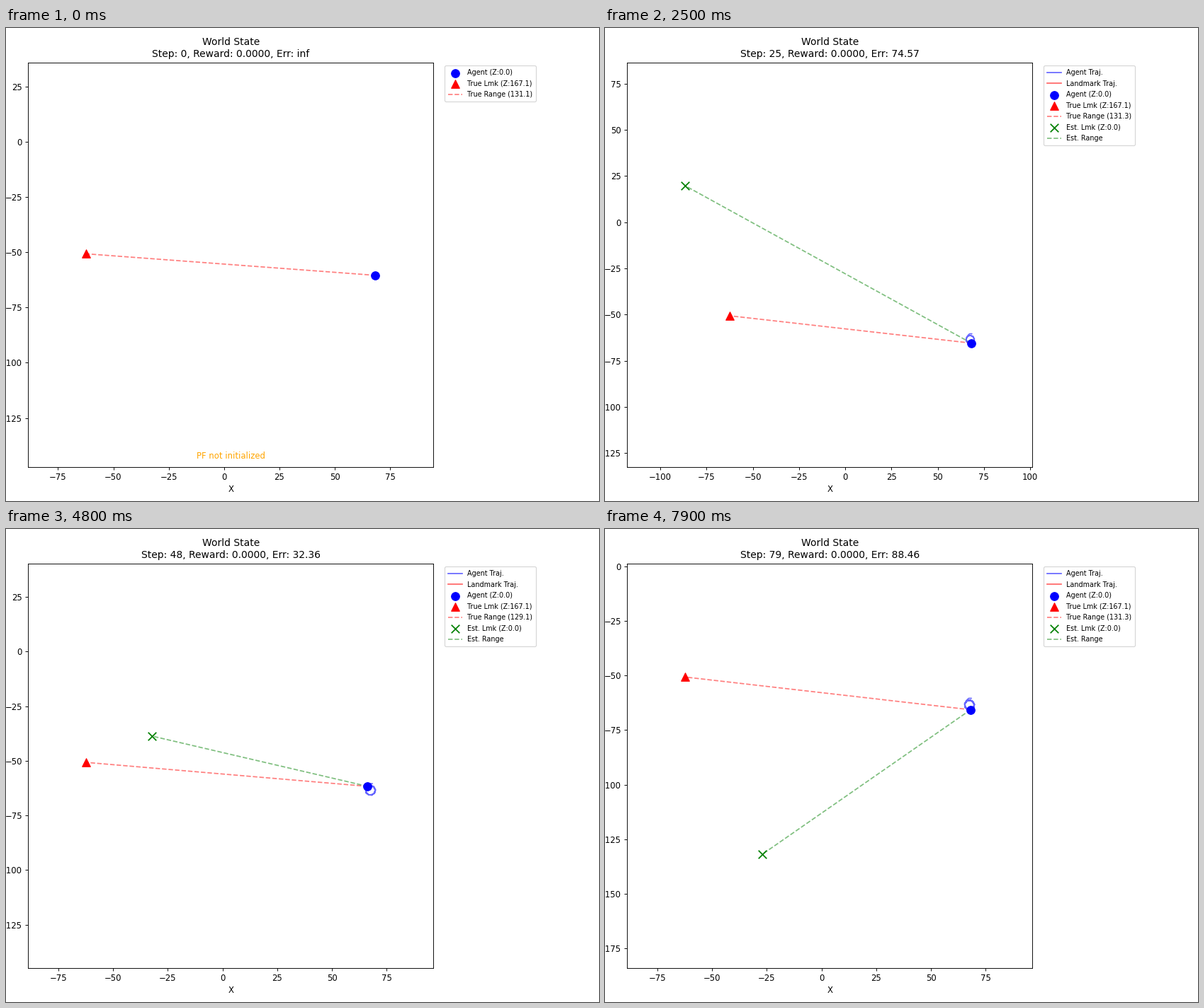
These frames come from a looping animation (837x669 px, 8000 ms). A matplotlib script:

```python
import numpy as np
import matplotlib.pyplot as plt
from matplotlib.animation import FuncAnimation

W, H, DPI = 837, 669, 83.25
STEPS, INTERVAL = 80, 100
LEFT, BOTTOM, SIDE = 31.2, 48.4, 572

plt.rcParams["font.family"] = "DejaVu Sans"
rng = np.random.default_rng(7)
steps = np.arange(STEPS)


def polar(radius, degrees):
    a = np.radians(degrees)
    return np.column_stack([radius * np.cos(a), radius * np.sin(a)])


landmark = np.array([-62.35, -50.7])

# Agent: counter-clockwise orbit, nine steps per turn, with a fading lead-in.
lead = np.exp(-(steps / 2.5) ** 2)
agent = np.array([67.6, -63.5]) + polar(2.2, 6 + 40 * steps + 63 * lead)
agent[:, 1] += lead
agent[1:] += rng.normal(0, 0.07, (STEPS - 1, 2))

# Estimate: wanders between key points (step, distance and bearing from landmark).
at, dist, bearing = np.array([
    (0, 0, 0), (14, 27.69, 106), (25, 74.57, 109), (40, 59.14, -17.4),
    (55, 45.45, 72.7), (65, 97.67, 71.3), (79, 88.46, -66.4),
]).T
drift = polar(dist, bearing)
wobble = rng.normal(0, 3, (STEPS, 2))
wobble[at.astype(int)] = 0
estimate = landmark + wobble + np.column_stack(
    [np.interp(steps, at, axis) for axis in drift.T])

fig = plt.figure(figsize=((W + 0.01) / DPI, (H + 0.01) / DPI), dpi=DPI, facecolor="white")
ax = fig.add_axes([LEFT / W, BOTTOM / H, SIDE / W, SIDE / H])


def gap(a, b):
    return np.hypot(*(a - b))


def segment(a, b, color, label):
    ax.plot([a[0], b[0]], [a[1], b[1]], "--", color=color, alpha=0.5, label=label)


def marker(p, shape, color, label):
    ax.scatter(*p, s=100, marker=shape, c=color, label=label, zorder=5)


def fit_view(points):
    lo, hi = points.min(axis=0), points.max(axis=0)
    mid, half = (lo + hi) / 2, 0.7 * (hi - lo).max()
    ax.set_xlim(mid[0] - half, mid[0] + half)
    ax.set_ylim(mid[1] - half, mid[1] + half)


def draw(n):
    ax.clear()
    path, here, guess = agent[:n + 1], agent[n], estimate[n]
    points = np.vstack([path, landmark])
    err = "inf"
    if n:
        ax.plot(*path.T, "b-", alpha=0.6, label="Agent Traj.")
        ax.plot(*np.tile(landmark, (2, 1)).T, "r-", alpha=0.6, label="Landmark Traj.")
    marker(here, "o", "blue", "Agent (Z:0.0)")
    marker(landmark, "^", "red", "True Lmk (Z:167.1)")
    segment(here, landmark, "red", f"True Range ({gap(here, landmark):.1f})")
    if n:
        marker(guess, "x", "green", "Est. Lmk (Z:0.0)")
        segment(here, guess, "green", "Est. Range")
        points = np.vstack([points, guess])
        err = f"{gap(guess, landmark):.2f}"
    else:
        ax.text(0.5, 0.02, "PF not initialized", color="orange",
                ha="center", transform=ax.transAxes)
    fit_view(points)
    ax.set_title(f"World State\nStep: {n}, Reward: 0.0000, Err: {err}",
                 pad=6.6, linespacing=1.27)
    ax.set_xlabel("X")
    ax.legend(loc="upper left", bbox_to_anchor=(1.02, 1), fontsize="small",
              borderpad=0.5, labelspacing=0.57)
    return []


anim = FuncAnimation(fig, draw, frames=STEPS, interval=INTERVAL,
                     init_func=lambda: draw(0), repeat=True, repeat_delay=0)
plt.show()
```
